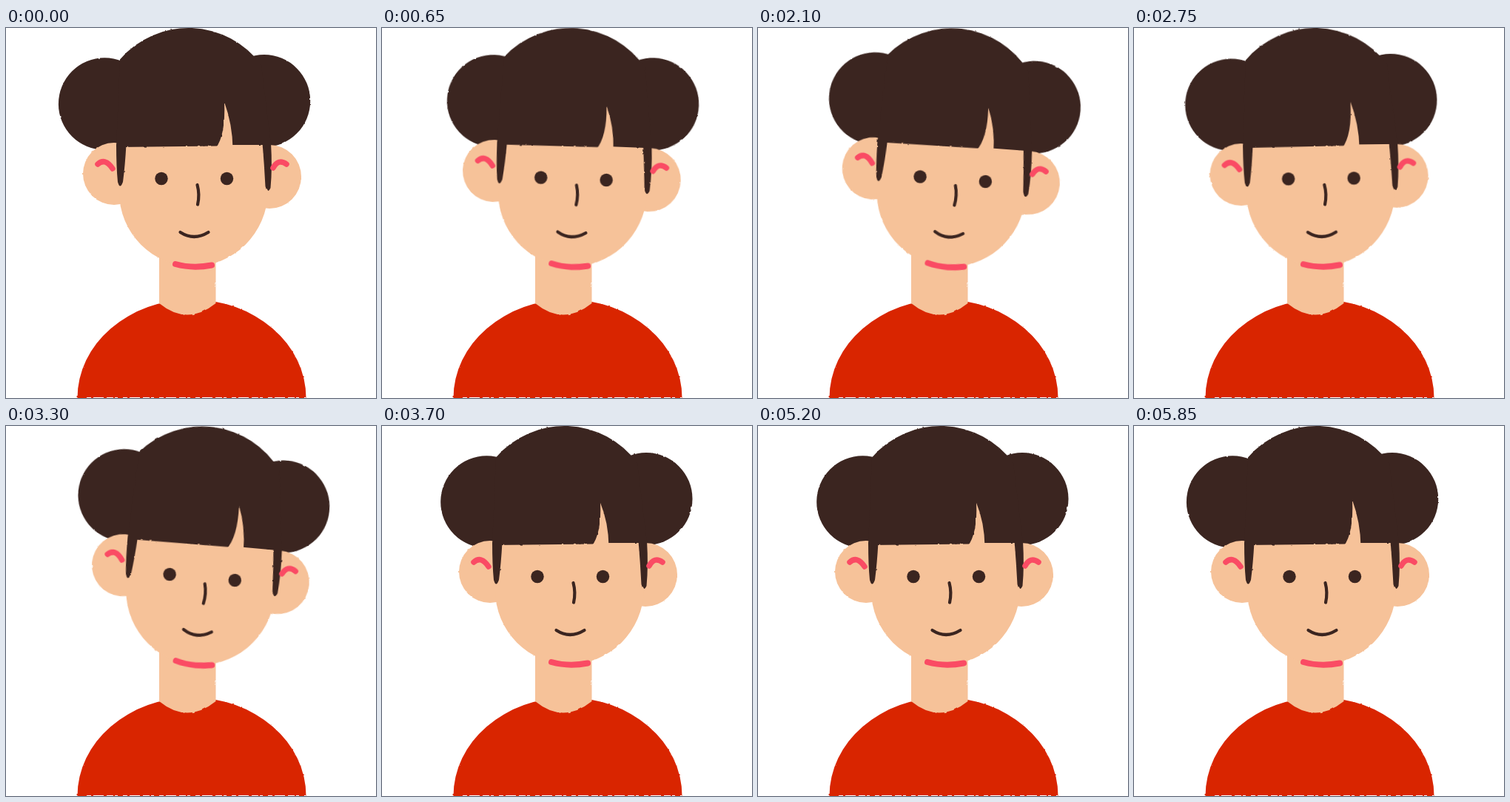
An HTML page for the animation above (6000 ms loop, 500 px wide and 500 px high).

```html
<!DOCTYPE html>
<html lang="en">
<head>
<meta charset="utf-8">
<title>Head tilt</title>
<style>
  html, body { margin: 0; width: 100%; height: 100%; overflow: hidden; background: #fff; }
  svg { display: block; width: 100vw; height: 100vh; }
  .skin { fill: #f6c299; }
  .hair { fill: #3b2520; }
  .ink, .pink { fill: none; stroke: #3b2520; stroke-width: 4.2; stroke-linecap: round; stroke-linejoin: round; }
  .pink { stroke: #fa4b64; stroke-width: 8; }
</style>
</head>
<body>
<svg viewBox="0 0 500 500">
  <!-- slightly rough, hand-cut edges -->
  <filter id="rough" filterUnits="userSpaceOnUse" x="-10" y="-10" width="520" height="520" color-interpolation-filters="sRGB">
    <feTurbulence type="fractalNoise" baseFrequency=".14" numOctaves="2" seed="4"/>
    <feDisplacementMap in="SourceGraphic" scale="2" xChannelSelector="R" yChannelSelector="G"/>
  </filter>
  <g filter="url(#rough)">
    <path fill="#d92500" d="M96.500 510V500A154.500 133 0 0 1 405.500 500V510Z"/>
    <path class="skin" d="M207 290H283.500V372Q245 403 207 372Z"/>
    <g class="tilt">
      <g id="buns" class="hair">
        <circle cx="133.2" cy="102.5" r="62.3"/>
        <circle cx="348.8" cy="98.5" r="62.4"/>
      </g>
      <g class="skin">
        <circle cx="146" cy="197" r="42"/>
        <circle cx="356" cy="201" r="43"/>
        <path d="M153 140H354V222A101 103 0 0 1 253 322A100 100 0 0 1 153 222Z"/>
      </g>
      <path class="hair" d="M149 161L154 42.500A122 122 0 0 1 345 50L358 158H306L284 159.500Z"/>
      <path id="parting" class="skin"/>
      <path class="hair" d="M149 157H162.500Q161 185 158 208Q154 219 151 208Q149 188 149 157Z
        M346.500 155H358Q360 190 357.500 216Q353.500 225 350.500 214Q349 185 346.500 155Z"/>
    </g>
  </g>
  <g class="tilt">
    <path class="pink" d="M124 184Q134 175 144 190M361 189Q368 176 379 184" style="stroke-width:7.5"/>
    <g class="hair">
      <circle cx="210" cy="203.5" r="8.7"/>
      <circle cx="298.5" cy="203.5" r="8.7"/>
    </g>
    <path class="ink" d="M258.500 212Q262 225 259 238.500M235.500 276Q254 288 273.500 276"/>
    <path class="pink" d="M229 319Q252 325.500 278 320.500"/>
  </g>
  <path d="M109 499.500H405" stroke="#fff" stroke-dasharray="6 3 14 4 9 2 4 7"/>
</svg>
<script>
  const CYCLE = 1500, STEP = 50;
  const KEYS = [0, 460, 940, 1320];
  const TILT = [0, 7.2, -7.2, 0];
  const SLIDE = [0, 8.3, 8.3, 0];
  const layers = document.querySelectorAll(".tilt");
  const buns = document.getElementById("buns");
  const parting = document.getElementById("parting");

  // Eased value between neighbouring keys
  function ease(values, t) {
    const i = KEYS.findIndex(k => t < k);
    if (i < 0) return values[values.length - 1];
    const u = (t - KEYS[i - 1]) / (KEYS[i] - KEYS[i - 1]);
    return values[i - 1] + (values[i] - values[i - 1]) * u * u * (3 - 2 * u);
  }

  function draw(now) {
    const t = Math.floor(now % CYCLE / STEP) * STEP;
    const slide = ease(SLIDE, t);
    const tip = 100 + slide * 0.45;
    for (const layer of layers) layer.setAttribute("transform", `rotate(${ease(TILT, t)} 249 325)`);
    buns.setAttribute("transform", `translate(${slide} 0)`);
    parting.setAttribute("d", `M283 163Q297 145 295 ${tip}Q306 130 306.500 163Z`);
  }

  function loop() {
    draw(performance.now());
    requestAnimationFrame(loop);
  }
  loop();
</script>
</body>
</html>
```
